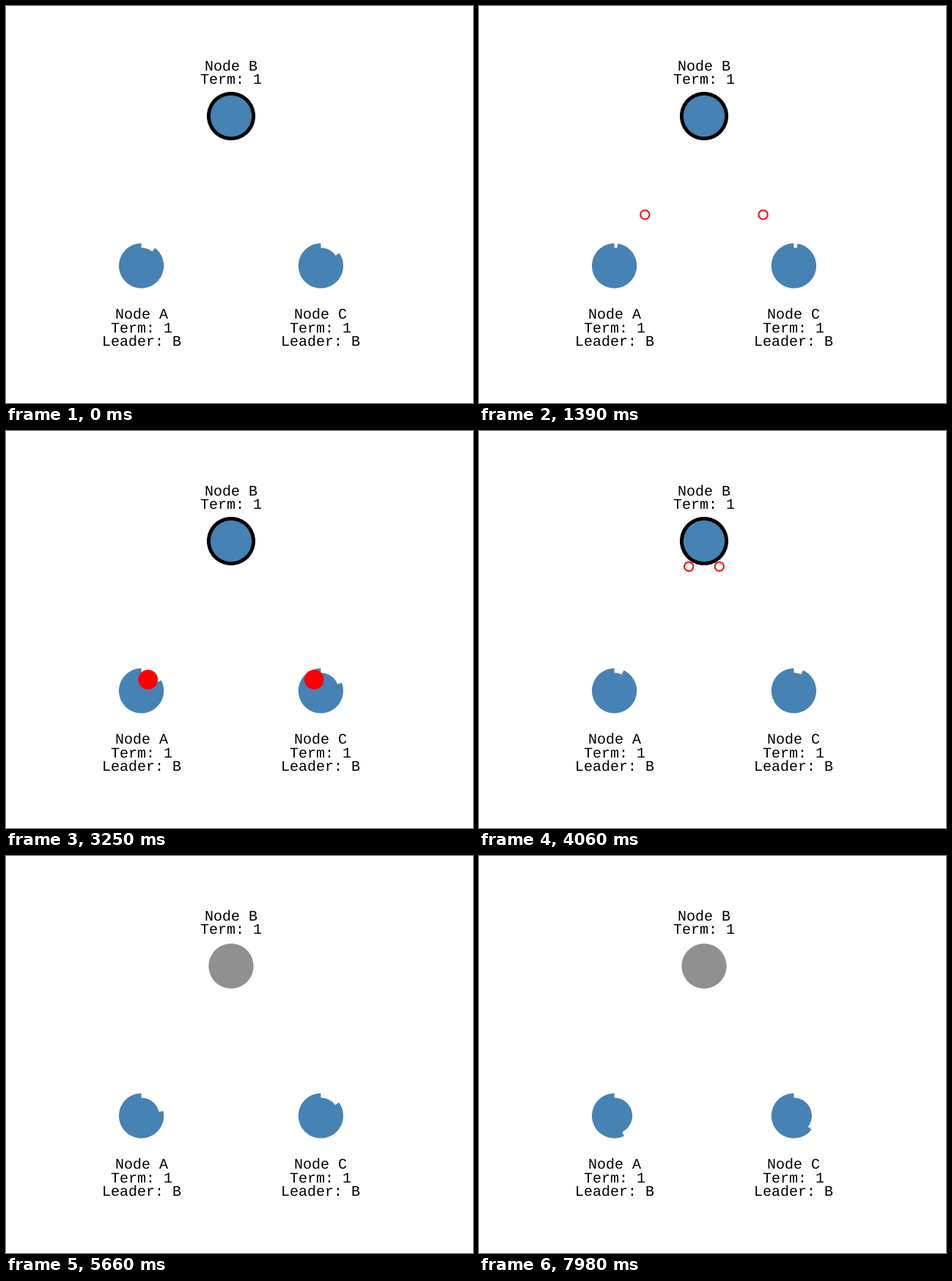
A matplotlib script for the animation above (8 s loop, 637 by 541 pixels).

```python
import matplotlib.pyplot as plt
from matplotlib.animation import FuncAnimation
from matplotlib.patches import Circle, Wedge

W, H, DPI = 637, 541, 64
PT = 72 / DPI                      # points per pixel
LOOP, STEP = 8000, 20              # ms
BLUE, GREY, RED = "#4682b4", "#909090", "#ff0000"

A, B, C = (184.6, 354), (307, 150), (429.4, 354)
R, INNER = 30.6, 24.5
FONT = 20                          # pixels
ADVANCE = 12
KILL = 4430                        # leader stops

# (arrival of the heartbeat at the followers, one-way trip) in ms
ROUNDS = [(1066, 920), (3308, 906)]

# (timer reset, degrees per ms for A, degrees per ms for C)
TIMERS = [(-1174, 0.0319, 0.0473), (1066, 0.0286, 0.0316), (3308, 0.0330, 0.0319)]
HOLD = (4990, 5660)                # C's timer stands still

plt.rcParams["text.hinting"] = "none"
plt.rcParams["text.kerning_factor"] = 0

fig = plt.figure(figsize=(W / DPI, H / DPI), dpi=DPI, facecolor="white")
ax = fig.add_axes([0, 0, 1, 1])
ax.set_xlim(0, W)
ax.set_ylim(H, 0)
ax.axis("off")


def label(cx, baseline, text):
    ax.text(cx - len(text) * ADVANCE / 2, baseline, text, family="Liberation Mono",
            size=FONT * PT, color="black", ha="left", va="baseline")


def follower(pos):
    """Disc with an outer ring that is eaten away clockwise from the top."""
    ring = Wedge(pos, R, -90, 270, fc=BLUE, lw=0)
    ax.add_patch(ring)
    ax.add_patch(Circle(pos, INNER, fc=BLUE, lw=0))
    return ring


def message(radius, fill, width):
    dot = Circle(B, radius, fc=fill, ec=RED, lw=width * PT, zorder=3, visible=False)
    return ax.add_patch(dot)


ring_a, ring_c = follower(A), follower(C)
leader = ax.add_patch(Circle(B, R, fc=BLUE, ec="black", lw=4.9 * PT))
beats = [message(12.2, RED, 2.2) for _ in range(2)]
replies = [message(6.1, "white", 1.9) for _ in range(2)]

label(B[0], 88, "Node B")
label(B[0], 106, "Term: 1")
for node, name in ((A, "A"), (C, "C")):
    label(node[0], 426, f"Node {name}")
    label(node[0], 445, "Term: 1")
    label(node[0], 463, "Leader: B")


def place(dot, start, end, k):
    dot.set_visible(0 <= k < 1)
    dot.center = tuple(s + (e - s) * k for s, e in zip(start, end))


def gaps(t):
    reset, rate_a, rate_c = [row for row in TIMERS if row[0] <= t][-1]
    held = min(max(t - HOLD[0], 0), HOLD[1] - HOLD[0])
    return (t - reset) * rate_a, (t - reset - held) * rate_c


def draw(i):
    t = i * STEP
    for ring, gap in zip((ring_a, ring_c), gaps(t)):
        ring.set_theta1(gap - 90)

    alive = t < KILL
    leader.set_facecolor(BLUE if alive else GREY)
    leader.set_linewidth(4.9 * PT if alive else 0)

    arrive, trip = next((r for r in ROUNDS if t < r[0] + r[1]), ROUNDS[-1])
    k = (t - arrive) / trip
    for node, beat, reply in zip((A, C), beats, replies):
        place(beat, B, node, k + 1)
        place(reply, node, B, k)
    return [ring_a, ring_c, leader, *beats, *replies]


anim = FuncAnimation(fig, draw, frames=LOOP // STEP, interval=STEP,
                     init_func=lambda: draw(0), repeat=True, repeat_delay=0)
plt.show()
```
